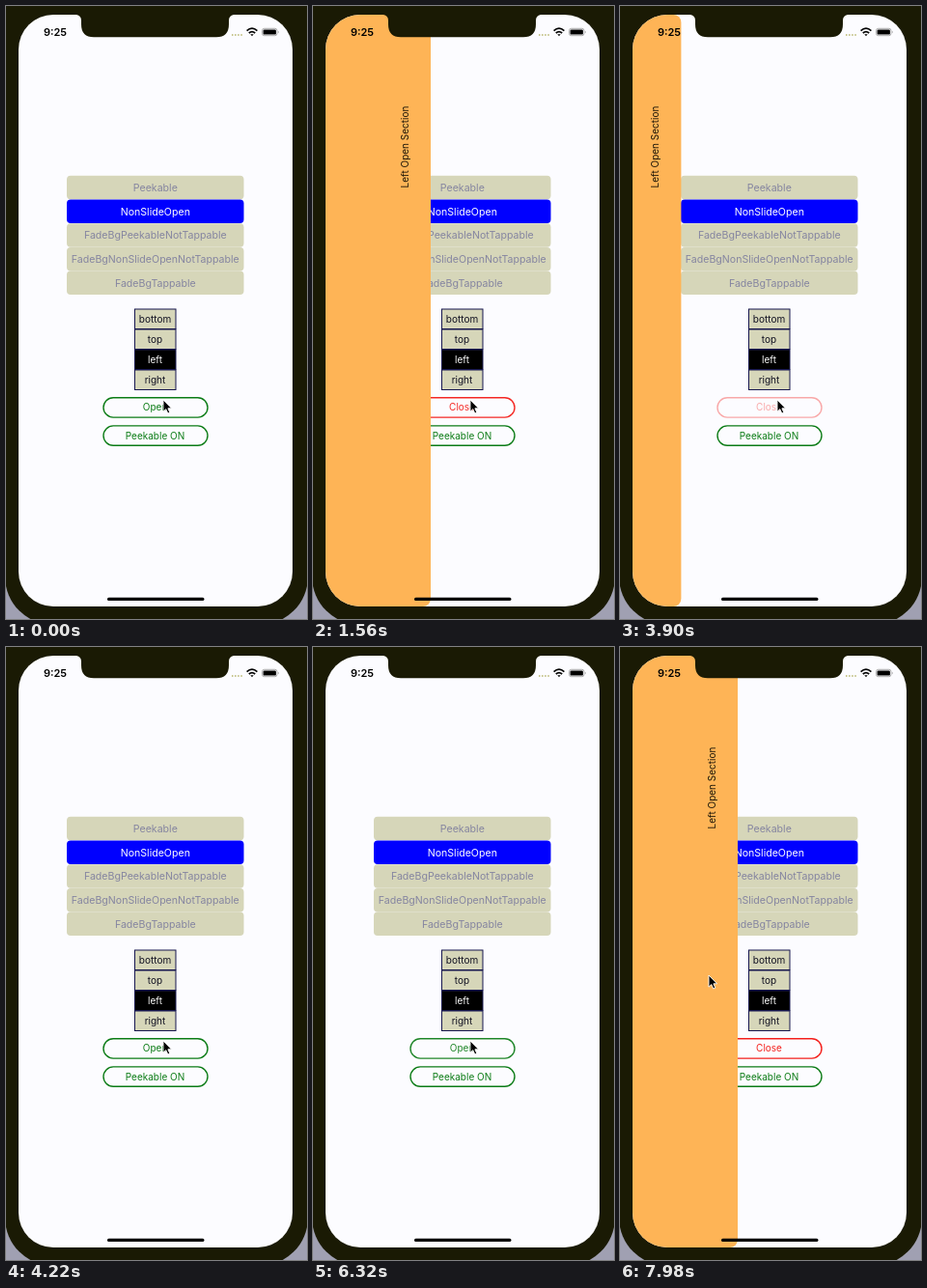
Write an HTML page that moves like this. It is 312 px wide and 635 px high and loops after 8 s.

```html
<!DOCTYPE html>
<html lang="en">
<head>
<meta charset="utf-8">
<title>Sliding panel</title>
<style>
  html, body { margin: 0; width: 100%; height: 100%; overflow: hidden; background: #a0a0b2; }
  svg { display: block; width: 100vw; height: 100vh; }
  text { font-family: Inter, "Open Sans", sans-serif; font-size: 10px; text-anchor: middle; }
  .list text { font-size: 10.6px; }
  .pill rect { fill: none; stroke: currentColor; stroke-width: 1.4; }
  .pill text { fill: currentColor; }
</style>
</head>
<body>
<svg viewBox="0 0 312 635">
  <defs>
    <clipPath id="screen"><rect x="13" y="9" width="284" height="613" rx="36"/></clipPath>
  </defs>
  <rect x="-1" y="-50" width="314" height="691" rx="50" fill="#1a1a04"/>
  <g clip-path="url(#screen)">
    <rect width="312" height="635" fill="#fcfcff"/>
    <g class="list" id="styles"></g>
    <g id="sides"></g>
    <g class="pill" id="toggle">
      <rect x="101" y="405.7" width="108" height="20.4" rx="10.2"/>
      <text id="toggleLabel" x="154.5" y="419.4"></text>
    </g>
    <g class="pill" color="#0c7c16">
      <rect x="101" y="434.9" width="108" height="20.4" rx="10.2"/>
      <text x="154.5" y="448.6">Peekable ON</text>
    </g>
    <g id="panel">
      <rect x="-20" y="9" width="142" height="613" rx="8" fill="#feb456"/>
      <text transform="translate(98.6 146) rotate(-90)" fill="#1c1608">Left Open Section</text>
    </g>
  </g>
  <path fill="#1a1a04" d="M73 8V9Q78 10 78 15V19Q78 32.3 91 32.3H218Q231 32.3 231 19V15Q231 10 236 9V8Z"/>
  <text x="51" y="31" style="font-size:11px;font-weight:600">9:25</text>
  <path d="M234 30h11" stroke="#b5b36a" stroke-width="1.5" stroke-dasharray="1.5 1.6"/>
  <g fill="none" stroke="#000" stroke-width="1.7">
    <path d="M249.6 25.6Q255 20.8 260.4 25.6M251.8 28Q255 25.2 258.2 28"/>
    <path d="M253.3 29.2h3.4L255 31.2Z" fill="#000" stroke="none"/>
  </g>
  <rect x="265.5" y="23.3" width="15.5" height="7.4" rx="2.2" fill="none" stroke="#999" stroke-width=".8"/>
  <rect x="266.6" y="24.4" width="13.3" height="5.2" rx="1.2"/>
  <path d="M282 25.7q1.5 1.3 0 2.6z" fill="#888"/>
  <rect x="105" y="612.8" width="100.5" height="3.2" rx="1.6"/>
  <path id="cursor" d="M0 0V12.2L2.8 9.6L4.8 14L6.8 13.1L4.9 8.8H8.6Z" stroke="#fff" stroke-width=".9"/>
</svg>
<script>
const LOOP = 8000, SLIDE = 180, FADE_IN = 150, FADE_OUT = 280, TRAVEL = 110;
const releases = [1324, 3808, 6437];
const byId = id => document.getElementById(id);
const clamp = x => Math.min(1, Math.max(0, x));
const ease = x => {
  const u = clamp(x);
  return u < .5 ? 2 * u * u : 1 - 2 * (1 - u) ** 2;
};

byId('styles').innerHTML = ['Peekable', 'NonSlideOpen', 'FadeBgPeekableNotTappable',
  'FadeBgNonSlideOpenNotTappable', 'FadeBgTappable'].map((name, i) => {
    const y = 175.8 + i * 24.7, chosen = i === 1;
    return `<rect x="63" y="${y}" width="183.5" height="24.5" rx="4" fill="${chosen ? '#00f' : '#d6d6b9'}"/>
      <text x="154.8" y="${y + 16.2}" fill="${chosen ? '#fff' : '#8585a0'}">${name}</text>`;
  }).join('');

byId('sides').innerHTML = ['bottom', 'top', 'left', 'right'].map((name, i) => {
  const y = 314 + i * 21, chosen = i === 2;
  return `<rect x="133.5" y="${y}" width="42.5" height="20.5" fill="${chosen ? '#000' : '#d6d6b9'}" stroke="#17174f"/>
    <text x="154.5" y="${y + 13.8}" fill="${chosen ? '#fff' : '#101020'}">${name}</text>`;
}).join('');

function draw(t) {
  let open = 0, opacity = 1, isOpen = false;
  releases.forEach((release, i) => {
    const slide = ease((t - release) / SLIDE);
    open += i % 2 ? -slide : slide;
    if (t >= release + SLIDE) isOpen = i % 2 === 0;
    const pressed = ease((t - release + FADE_IN) / FADE_IN);
    const restored = ease((t - release) / FADE_OUT);
    opacity -= .8 * (pressed - restored);
  });
  byId('panel').setAttribute('transform', `translate(${(open - 1) * TRAVEL} 0)`);
  byId('toggle').setAttribute('opacity', opacity);
  byId('toggle').setAttribute('color', isOpen ? '#f4201c' : '#0c7c16');
  byId('toggleLabel').textContent = isOpen ? 'Close' : 'Open';
  const move = ease((t - 7000) / 600);
  byId('cursor').setAttribute('transform', `translate(${163 - 71 * move} ${408 - 68 * move})`);
}

const start = performance.now();
function tick() {
  draw((performance.now() - start) % LOOP);
  requestAnimationFrame(tick);
}
tick();
</script>
</body>
</html>
```
